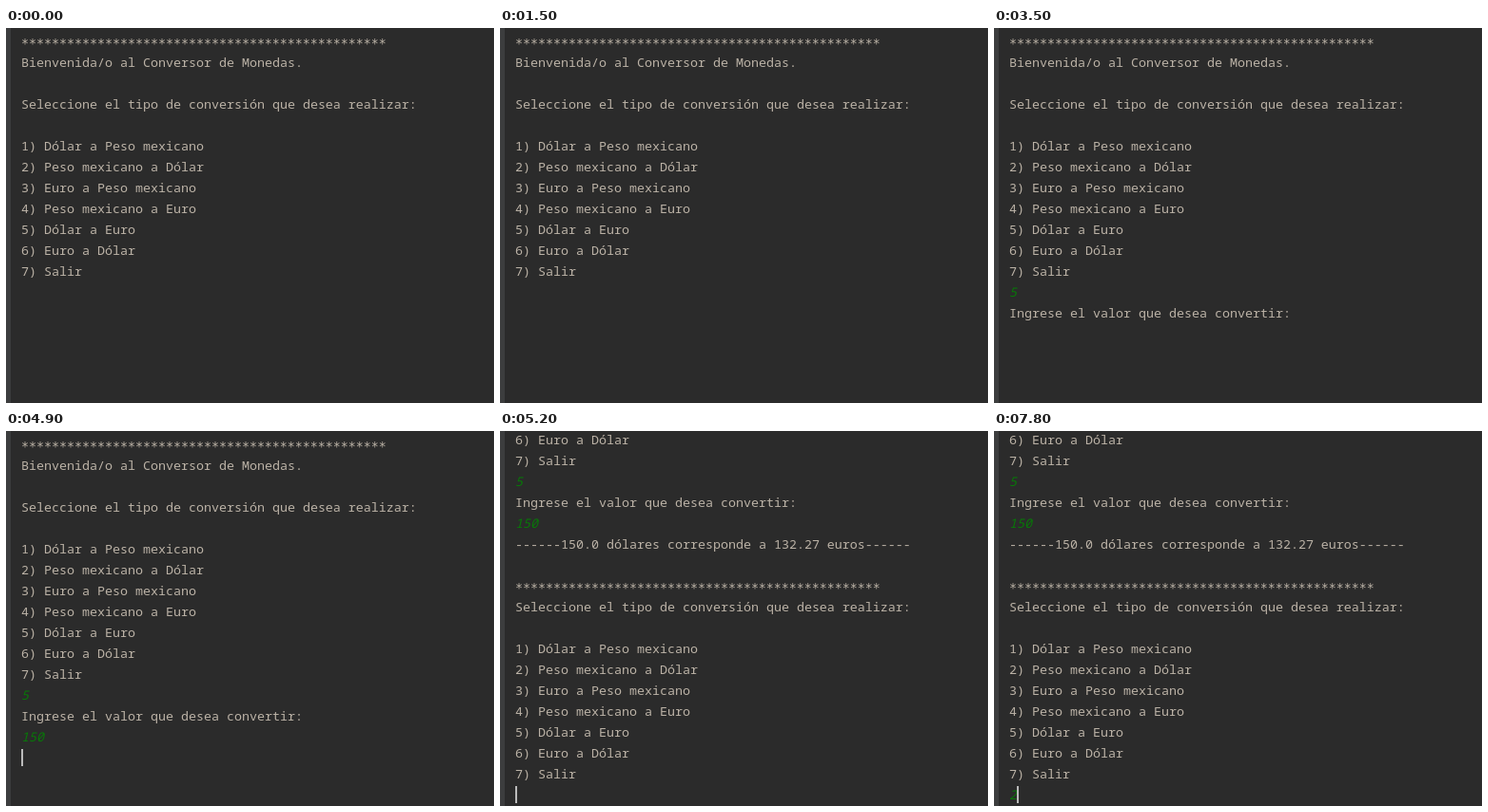
Animation, 513 px wide and 395 px high, one loop 8 s. Source, as an HTML page:

```html
<!DOCTYPE html>
<html lang="es">
<head>
<meta charset="utf-8">
<title>Conversor de Monedas</title>
<style>
  html, body { margin: 0; width: 100%; height: 100%; overflow: hidden; background: #2b2b2b; }
  body::before { content: ""; position: absolute; left: 0; top: 0; width: 5px; height: 100%; background: #3c3d3e; }
  #console {
    position: absolute; left: 16px; top: 3px;
    font: 13.333px/22px "Noto Sans Mono", monospace;
    color: #bbb2a6; white-space: pre;
  }
  #console div { height: 22px; }
  .stars { position: relative; top: 3px; font-family: "DejaVu Sans Mono", monospace; font-size: 13.29px; }
  .input { color: #087808; font-style: italic; }
  #caret { position: absolute; width: 2px; height: 18px; background: #bbb; }
</style>
</head>
<body>
<div id="console"></div>
<script>
const LOOP = 8000, ROW = 22, CHAR = 8;
const screen = document.getElementById("console");
const stars = "*".repeat(48);
const dashes = "-".repeat(6);
const menu = [
  "Seleccione el tipo de conversión que desea realizar:",
  "",
  "1) Dólar a Peso mexicano",
  "2) Peso mexicano a Dólar",
  "3) Euro a Peso mexicano",
  "4) Peso mexicano a Euro",
  "5) Dólar a Euro",
  "6) Euro a Dólar",
  "7) Salir"
];
const first = [stars, "Bienvenida/o al Conversor de Monedas.", "", ...menu];
const asked = [...first, "5", "Ingrese el valor que desea convertir:"];
const paid = [...asked, "150"];
const done = [...paid, `${dashes}150.0 dólares corresponde a 132.27 euros${dashes}`, "", stars, ...menu];

// start time, printed lines, typed text, caret visible, scroll
const steps = [
  [0, first, "", false, 0],
  [500, first, "", true, 0],
  [1500, first, "", false, 0],
  [1700, first, "5", true, 0],
  [2500, asked, "", true, 0],
  [3500, asked, "", false, 0],
  [3600, asked, "1", true, 0],
  [3800, asked, "15", true, 0],
  [4100, asked, "150", true, 0],
  [4900, paid, "", true, 0],
  [5100, done, "", true, 16],
  [5200, done, "", true, 225],
  [6200, done, "", false, 225],
  [6800, done, "", true, 225],
  [7300, done, "", false, 225],
  [7700, done, "", true, 225],
  [7800, done, "2", true, 225]
];

function addLine(text) {
  const line = document.createElement("div");
  line.textContent = text;
  if (text === stars) line.className = "stars";
  else if (/^\d+$/.test(text)) line.className = "input";
  screen.append(line);
}

function show([, lines, typed, caretOn, scroll]) {
  screen.replaceChildren();
  [...lines, typed].forEach(addLine);
  if (caretOn) {
    const caret = document.createElement("span");
    caret.id = "caret";
    caret.style.left = typed.length * CHAR + "px";
    caret.style.top = lines.length * ROW + 2 + "px";
    screen.append(caret);
  }
  screen.style.top = 3 - scroll + "px";
}

let current;
function tick() {
  const t = performance.now() % LOOP;
  const step = steps.findLast(s => s[0] <= t);
  if (step !== current) show(current = step);
  requestAnimationFrame(tick);
}
tick();
</script>
</body>
</html>
```
